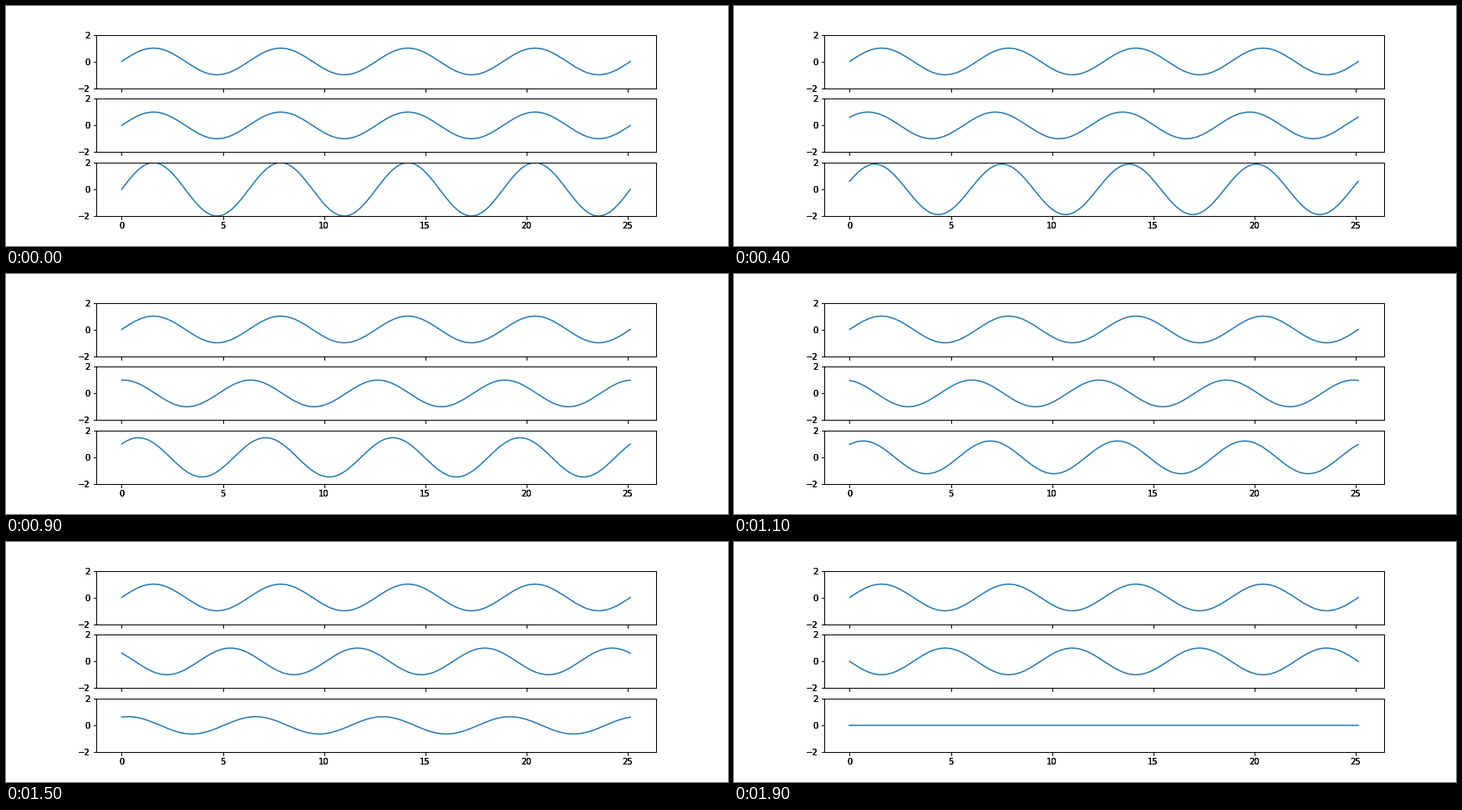
Write a matplotlib script that moves like this. It is 864x288 px and loops after 2 s.

```python
import numpy as np
import matplotlib.pyplot as plt
from matplotlib.animation import FuncAnimation

FRAMES = 20
plt.rcParams.update({
    "font.family": "DejaVu Sans",
    "font.size": 10,
    "axes.linewidth": 1,
    "xtick.major.width": 1,
    "ytick.major.width": 1,
})

fig, axes = plt.subplots(3, 1, sharex=True, figsize=(12, 4), dpi=72)
fig.subplots_adjust(left=0.125, right=0.9, bottom=0.125, top=0.88, hspace=0.2)

x = np.linspace(0, 8 * np.pi, 1000)
fixed = np.sin(x)
lines = [ax.plot(x, fixed, color="#1f77b4", lw=1.5)[0] for ax in axes]


def darken_labels(ax, layers=2):
    """Stack copies of the tick labels so their soft edges turn solid."""
    for _ in range(layers):
        top = fig.add_axes(ax.get_position(), frameon=False,
                           sharex=ax, sharey=ax)
        top.tick_params(labelbottom=ax is axes[-1])


for ax in axes:
    ax.set_xlim(-0.4 * np.pi, 8.4 * np.pi)
    ax.set_ylim(-2, 2)
    ax.set_yticks([-2, 0, 2])
    darken_labels(ax)


def update(i):
    moving = np.sin(x + np.pi * i / (FRAMES - 1))
    lines[1].set_ydata(moving)
    lines[2].set_ydata(fixed + moving)
    return lines


anim = FuncAnimation(fig, update, frames=FRAMES, interval=100,
                     repeat=True, repeat_delay=0)
plt.show()
```
